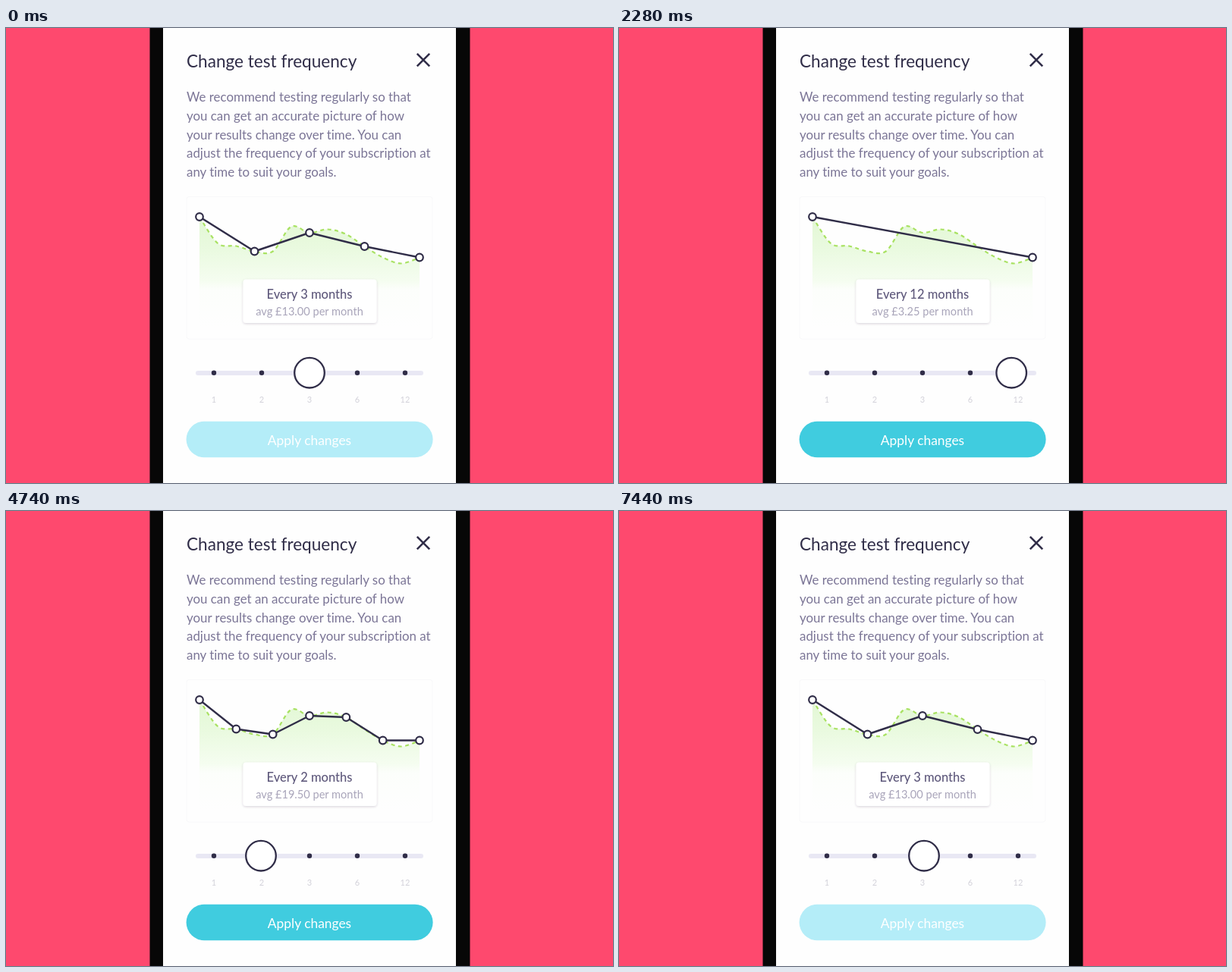
An HTML page for the animation above (7470 ms loop, 800 by 600 pixels).

```html
<!DOCTYPE html>
<html lang="en">
<head>
<meta charset="utf-8">
<title>Change test frequency</title>
<style>
  html, body { margin: 0; width: 100%; height: 100%; overflow: hidden; background: #fe496e; }
  svg {
    display: block; width: 100%; height: 100%;
    font-family: Lato, sans-serif; font-variant-ligatures: none;
  }
  .mid { text-anchor: middle; }
  .ink { fill: none; stroke: #302d48; stroke-linejoin: round; }
</style>
</head>
<body>
<svg viewBox="0 0 800 600">
  <defs>
    <linearGradient id="fade" gradientUnits="userSpaceOnUse" x1="0" y1="248" x2="0" y2="395">
      <stop offset="0" stop-color="#e2f7d4"/>
      <stop offset=".3" stop-color="#eafae0"/>
      <stop offset=".58" stop-color="#f5fdf0"/>
      <stop offset=".66" stop-color="#fcfefb"/>
      <stop offset="1" stop-color="#fefefe"/>
    </linearGradient>
    <filter id="shadow" x="-10%" y="-20%" width="120%" height="150%">
      <feDropShadow dx="0" dy="1" stdDeviation="1.6" flood-color="#302d48" flood-opacity=".2"/>
    </filter>
  </defs>

  <rect width="800" height="600" fill="#fe496e"/>
  <rect x="189.5" width="422" height="600" fill="#070707"/>
  <rect x="207" width="386" height="600" fill="#fefefe"/>

  <text x="238" y="51.5" font-size="22.6" fill="#302d48">Change test frequency</text>
  <path class="ink" d="M541.8 33.9 558.2 50.3M558.2 33.9 541.8 50.3" stroke-width="2.6"/>
  <g id="copy" font-size="16.9" fill="#7b7596"></g>

  <rect x="238" y="222.5" width="324" height="187.5" rx="3" fill="none" stroke="#f8f8fa"/>
  <path id="area" fill="url(#fade)"/>
  <path id="curve" fill="none" stroke="#a9e263" stroke-width="2.2" stroke-dasharray="5 4.5"/>
  <g id="plot"></g>

  <rect x="312.5" y="331.5" width="176" height="57.5" rx="4" fill="#fff" filter="url(#shadow)"/>
  <text id="period" class="mid" x="400" y="357" font-size="16.5" font-weight="500" fill="#5f597c"></text>
  <text id="price" class="mid" x="400" y="378.5" font-size="14.6" fill="#a9a5ba"></text>

  <rect x="250" y="452" width="300" height="6" rx="3" fill="#e9e8f4"/>
  <g id="ticks"></g>
  <circle id="knob" class="ink" cy="454.7" r="19.8" stroke-width="2.3" style="fill:#fff"/>

  <rect id="button" x="237.6" y="518.7" width="325" height="47.6" rx="23.8"/>
  <text class="mid" x="400" y="550" font-size="17.4" fill="#fff">Apply changes</text>
</svg>
<script>
const LOOP = 7470, FRAME = 30;
const MONTHS = [1, 2, 3, 6, 12];
const FIRST = 274, GAP = 63;
const IDLE = [180, 237, 248], ACTIVE = [64, 204, 223];

const COPY = [
  'We recommend testing regularly so that',
  'you can get an accurate picture of how',
  'your results change over time. You can',
  'adjust the frequency of your subscription at',
  'any time to suit your goals.'
];

const LEVELS = [249, 284, 287.5, 294.5, 294.5, 262, 270, 265.5, 272, 288, 302.5, 310.5, 302.5];
const points = LEVELS.map((y, i) => [255 + i * 290 / 12, y]);

// Knob drag: time, x
const DRAG = [
  [0, 400], [900, 463],
  [1260, 463], [1440, 491.5], [1830, 526],
  [2100, 526], [2280, 517.2], [2760, 463],
  [3090, 463], [3330, 431.7], [3690, 400],
  [3900, 400], [4530, 337],
  [4710, 337], [4740, 336], [5460, 274],
  [5850, 274], [6000, 287.5], [6420, 337],
  [6630, 337], [7200, 404.5], [7380, 404], [7440, 402], [LOOP, 400]
];

const $ = id => document.getElementById(id);

function add(parent, tag, attrs, text = '') {
  const el = document.createElementNS('http://www.w3.org/2000/svg', tag);
  for (const key in attrs) el.setAttribute(key, attrs[key]);
  el.textContent = text;
  parent.append(el);
  return el;
}

const slope = i => (DRAG[i + 1][1] - DRAG[i][1]) / (DRAG[i + 1][0] - DRAG[i][0]);

// Harmonic mean keeps the interpolation free of overshoot
function tangent(i) {
  if (i === 0 || i === DRAG.length - 1) return 0;
  const a = slope(i - 1), b = slope(i);
  return a * b <= 0 ? 0 : 2 * a * b / (a + b);
}

function knobAt(time) {
  const t = (time % LOOP + LOOP) % LOOP;
  const i = DRAG.findIndex(key => key[0] > t) - 1;
  const [t0, x0] = DRAG[i], [t1, x1] = DRAG[i + 1];
  const d = t1 - t0, u = (t - t0) / d, v = 1 - u;
  return x0 * v * v * (1 + 2 * u) + x1 * u * u * (3 - 2 * u)
    + d * u * v * (tangent(i) * v - tangent(i + 1) * u);
}

const stepAt = time => Math.round((knobAt(time) - FIRST) / GAP);

// Share of the last 200 ms spent away from the saved value
function activity(time) {
  let sum = 0;
  for (let k = 0; k < 10; k++) sum += stepAt(time - k * 20) !== 2;
  return sum / 10;
}

function smoothPath(p) {
  const at = i => p[Math.max(0, Math.min(p.length - 1, i))];
  let d = `M${p[0]}`;
  for (let i = 0; i < p.length - 1; i++) {
    const [a, b, c, e] = [at(i - 1), at(i), at(i + 1), at(i + 2)];
    d += `C${b.map((v, k) => v + (c[k] - a[k]) / 6)} ${c.map((v, k) => v - (e[k] - b[k]) / 6)} ${c}`;
  }
  return d;
}

COPY.forEach((line, i) => add($('copy'), 'text', { x: 238, y: 97 + i * 24.8 }, line));

MONTHS.forEach((n, i) => {
  const x = FIRST + i * GAP;
  add($('ticks'), 'circle', { cx: x, cy: 454.8, r: 3.2, fill: '#302d48' });
  add($('ticks'), 'text', { class: 'mid', x, y: 494, 'font-size': 11, fill: '#d3d2da' }, n);
});

const curve = smoothPath(points);
$('curve').setAttribute('d', curve);
$('area').setAttribute('d', `${curve}V395H255Z`);

const plots = MONTHS.map(n => {
  const group = add($('plot'), 'g', {});
  const nodes = points.filter((_, i) => i % n === 0);
  add(group, 'polyline', { class: 'ink', points: nodes.join(' '), 'stroke-width': 2.4 });
  for (const [cx, cy] of nodes) {
    add(group, 'circle', { class: 'ink', cx, cy, r: 4.8, 'stroke-width': 2.2, style: 'fill:#fff' });
  }
  return group;
});

let shown = -1;

function showStep(step) {
  if (step === shown) return;
  shown = step;
  const n = MONTHS[step];
  plots.forEach((group, i) => group.setAttribute('display', i === step ? 'inline' : 'none'));
  $('curve').setAttribute('opacity', step ? 1 : 0);
  $('period').textContent = `Every ${n} months`;
  $('price').textContent = `avg £${(39 / n).toFixed(2)} per month`;
}

function draw(time) {
  const mix = activity(time);
  const color = IDLE.map((c, i) => Math.round(c + (ACTIVE[i] - c) * mix));
  $('knob').setAttribute('cx', knobAt(time));
  $('button').setAttribute('fill', `rgb(${color})`);
  showStep(stepAt(time));
}

const start = performance.now();

function tick() {
  const time = (performance.now() - start) % LOOP;
  draw(Math.floor(time / FRAME) * FRAME);
  requestAnimationFrame(tick);
}

draw(0);
requestAnimationFrame(tick);
</script>
</body>
</html>
```
